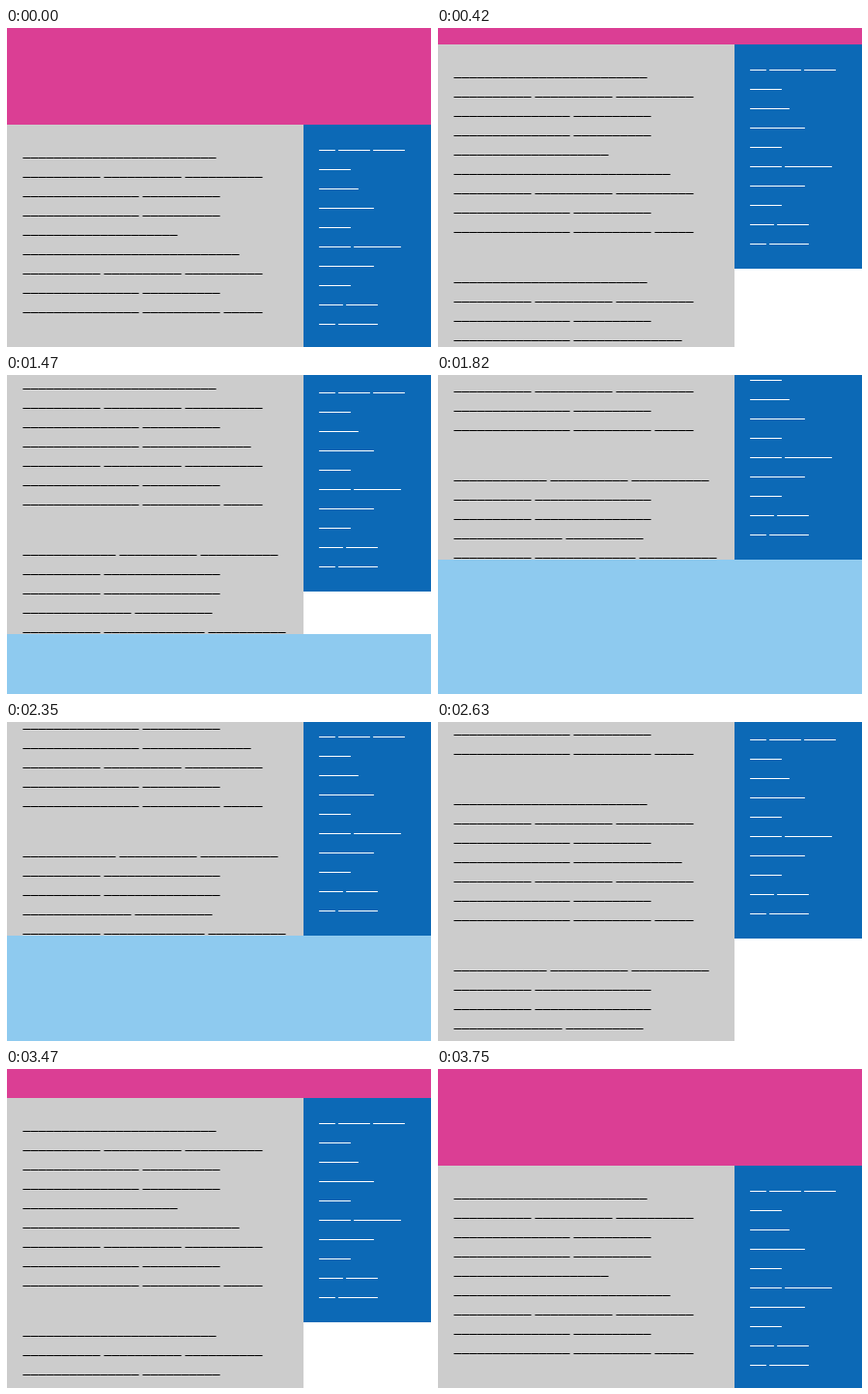
Recreate the animation shown at these times as an HTML page with a canvas. Size 440 px wide and 330 px high, loop 4890 ms.

```html
<!DOCTYPE html>
<html lang="en">
<head>
<meta charset="utf-8">
<title>Sticky sidebar</title>
<style>
  html, body { margin: 0; width: 100%; height: 100%; overflow: hidden; background: #fff; }
  canvas { display: block; }
</style>
</head>
<body>
<canvas id="stage" width="440" height="330"></canvas>
<script>
const ctx = document.getElementById('stage').getContext('2d');
const LOOP = 4890, STEP = 70, UP_START = 2350;
const HEADER = 100, FOOTER = 600, SIDE_HEIGHT = 232, STICKY_TOP = -8;
const LINE = 20, GAP = 32, CHAR = 8, SPACE = 4;

// The text is made of underscores; blank lines separate paragraphs.
const ten = '_'.repeat(10), fifteen = '_'.repeat(15);
const three = `${ten} ${ten} ${ten}`;
const two = `${fifteen} ${ten}`;
const tail = `${two} _____`;
const intro = ten + ten + '_____';
const article = [
  intro, three, two, two, ten + ten, '_'.repeat(28), three, two, tail, '',
  intro, three, two, `${fifteen} ______________`, three, two, tail, '',
  `____________ ${ten} ${ten}`, `${ten} ${fifteen}`, `${ten} ${fifteen}`,
  `______________ ${ten}`, `${ten} _____________ ${ten}`
];
const menu = ['__ ____ ____', '____', '_____', '_______', '____',
              '____ ______', '_______', '____', '___ ____', '__ _____'];

// [step, scroll offset]
const down = [[0, 0], [8, 110], [12, 178], [21, 332], [24, 382], [26, 409]];
const up = [[0, 409], [5, 261], [13, 128], [16, 87], [21, 0]];

function valueAt(keys, step) {
  const last = keys[keys.length - 1];
  const i = keys.findIndex(([end]) => step < end);
  if (i < 0) return last[1];
  const [a, from] = keys[i - 1], [b, to] = keys[i];
  return Math.round(from + (to - from) * (step - a) / (b - a));
}

function scrollAt(t) {
  return t < UP_START
    ? valueAt(down, Math.floor(t / STEP))
    : valueAt(up, Math.floor((t - UP_START) / STEP) + 1);
}

function box(color, x, y, w, h) {
  ctx.fillStyle = color;
  ctx.fillRect(x, y, w, h);
}

// Each underscore softly overlaps its neighbour; edge is the coverage of its end pixels.
function text(lines, color, edge, left, y) {
  for (const line of lines) {
    let x = left;
    for (const c of line) {
      if (c === '_') box(color, x + 1 - edge, y, CHAR - 1 + 2 * edge, 1);
      x += c === '_' ? CHAR : SPACE;
    }
    y += line ? LINE : GAP;
  }
}

function draw(scroll) {
  box('#fff', 0, 0, 440, 330);
  box('#ccc', 1, HEADER - scroll, 307, FOOTER - HEADER);
  text(article, '#000', 0.55, 17, HEADER + 34 - scroll);

  const side = Math.min(Math.max(HEADER - scroll, STICKY_TOP), FOOTER - SIDE_HEIGHT - scroll);
  box('#0c69b6', 308, side, 132, SIDE_HEIGHT);
  text(menu, '#fff', 0.9, 324, side + 26);

  box('#db3e94', 1, -scroll, 439, HEADER);
  box('#8ecaef', 1, FOOTER - scroll, 439, 330);
}

const start = performance.now();
function tick() {
  draw(scrollAt((performance.now() - start) % LOOP));
  requestAnimationFrame(tick);
}
tick();
</script>
</body>
</html>
```
